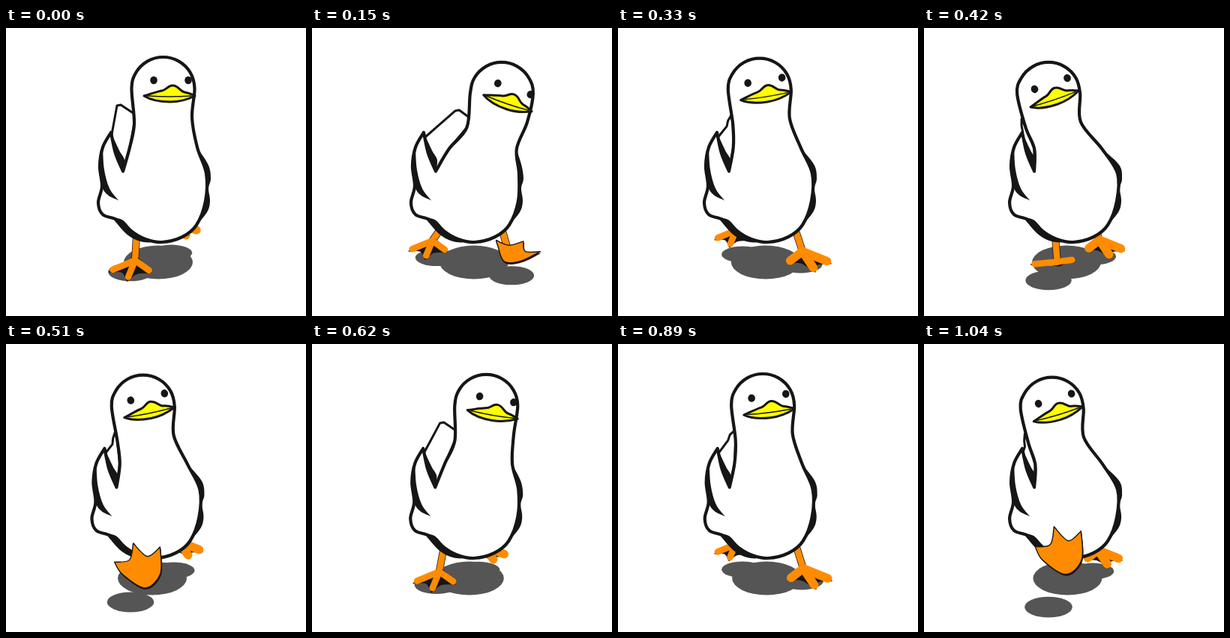
These frames come from a looping animation (400 px wide and 386 px high, 1140 ms). An HTML page with a canvas:

```html
<!DOCTYPE html>
<html lang="en">
<head>
<meta charset="utf-8">
<title>Walking duck</title>
<style>
  html, body { margin: 0; width: 100%; height: 100%; overflow: hidden; background: #fff; }
  canvas { display: block; }
</style>
</head>
<body>
<canvas id="stage" width="400" height="386"></canvas>
<script>
const ctx = document.getElementById('stage').getContext('2d');
const INK = '#161616', ORANGE = '#ff8c00', YELLOW = '#ffff00', SHADE = '#555';
const LOOP = 1140, STRIDE = LOOP / 2;

const mix = (a, b, k) => a + (b - a) * k;
const smooth = (from, to, v) => {
  const k = Math.min(1, Math.max(0, (v - from) / (to - from)));
  return k * k * (3 - 2 * k);
};
const outline = s => s.trim().split(/\s+/).map(p => p.split(',').map(Number));

// Eased path through a few [time, value] points
function follow(keys, u) {
  const i = keys.findIndex(k => k[0] > u);
  const [a, b] = [keys[i - 1], keys[i]];
  return mix(a[1], b[1], smooth(a[0], b[0], u));
}

// The duck standing upright
const neck = outline('156,192 165,160 171,128');
const head = Array.from({ length: 7 }, (_, i) => {
  const a = Math.PI * (1 + i / 6);
  return [209.5 + 42 * Math.cos(a), 81 + 42 * Math.sin(a)];
});
const flank = outline(`248,120 255,160 267,195 266,232 254,264 235,280 208,287
  186,283 166,272 148,257`);
const wing = outline('129,250 123,234 128,212 125,185 129,160 140,140');
const fold = outline('140,140 146,168 156,192');
const foldEdge = outline('156,193 158,177 151,164 140,140');
const feather = outline('129,160 125,185 128,212 136,224 150,231');
const featherEdge = outline('150,231 138,215 131,190 129,160');
const farSide = outline('256,162 270,184 273,202 270,215 272,232 268,247 252,266');
const belly = outline('142,255 155,257 169,271 186,282 208,286');
const bellyEdge = outline('208,286 184,287 163,278 142,255');

// Foot around its centre: ankle, toe, web, toe, web, toe, ankle, heel
const flatFoot = outline('0,-10 -28,5 -11,5 -4,17 9,7 28,6 13,-11 6,-13');
const soleFoot = outline('-22,14 -32,-4 -12,-7 -7,-31 12,-12 29,-25 30,13 9,33');

// Gait over one stride: ground position and height above it
const ground = [[0, 327], [.3, 307], [.55, 302], [.84, 353], [1, 327]];
const lift = [[0, 0], [.25, 8], [.46, 30], [.6, 18], [.74, 18], [.82, 72], [1, 0]];

// Smooth runs joined by corners
function shape(...runs) {
  const path = new Path2D();
  path.moveTo(...runs[0][0]);
  for (const p of runs) {
    for (let i = 0; i < p.length - 1; i++) {
      const a = p[i - 1] || p[i], b = p[i], c = p[i + 1], d = p[i + 2] || c;
      path.bezierCurveTo(
        b[0] + (c[0] - a[0]) / 6, b[1] + (c[1] - a[1]) / 6,
        c[0] - (d[0] - b[0]) / 6, c[1] - (d[1] - b[1]) / 6, c[0], c[1]);
    }
  }
  path.closePath();
  return path;
}

function paint(path, fill, width) {
  if (fill) {
    ctx.fillStyle = fill;
    ctx.fill(path);
  }
  if (width) {
    ctx.strokeStyle = INK;
    ctx.lineWidth = width;
    ctx.stroke(path);
  }
}

function line(from, to, color, width) {
  ctx.strokeStyle = color;
  ctx.lineWidth = width;
  ctx.beginPath();
  ctx.moveTo(...from);
  ctx.lineTo(...to);
  ctx.stroke();
}

function oval(x, y, rx, ry, color) {
  ctx.fillStyle = color;
  ctx.beginPath();
  ctx.ellipse(x, y, rx, ry, 0, 0, 7);
  ctx.fill();
}

// Hips shift early, the neck and head swing further
const hipShift = sway => 9 * Math.tanh(3 * sway);
function bend([x, y], sway) {
  const k = 1 - smooth(100, 190, y);
  const hip = hipShift(sway);
  return [x + mix(hip, 43.5 * sway, k), y + 7 * sway * sway * k];
}

function makeFoot(u, turn) {
  const near = follow(ground, u);
  const y = turn ? mix(300, near, .73) - .5 : near;
  const reach = (y - 300) / 52;
  const x = turn ? 230 + 62 * reach : 150 + 30 * reach;
  const cy = y - 5 - follow(lift, u);
  const pitch = smooth(.68, .82, u) * (1 - smooth(.88, 1, u));
  const size = .75 + .25 * Math.min(1, Math.max(0, reach * 4));
  const c = Math.cos(turn * .7), s = Math.sin(turn * .7);
  const points = flatFoot.map(([fx, fy], i) => {
    const [sx, sy] = soleFoot[i];
    return [
      x + size * mix(fx + turn * fy, sx * c - sy * s, pitch),
      cy + size * mix(fy, sx * s + sy * c, pitch)
    ];
  });
  const shadowX = turn ? 217 + (y - 299) * 1.5 : 166;
  return { points, turn, raised: pitch > .5, shadow: [shadowX, y] };
}

function drawFootShadow({ shadow: [x, y] }) {
  const depth = y - 305;
  oval(x, y, 28 + depth * .08, 11 + depth * .06, SHADE);
}

const midpoint = (a, b) => [(a[0] + b[0]) / 2, (a[1] + b[1]) / 2];

function drawLeg({ points, turn }, sway) {
  const ankle = midpoint(points[0], points[6]);
  const hip = [mix((turn ? 230 : 178) + hipShift(sway), ankle[0], .6), 270];
  line(hip, ankle, INK, 10);
  line(hip, ankle, ORANGE, 8.5);
}

function drawFoot({ points, turn, raised }) {
  const [ankleA, toe1, web1, toe2, web2, toe3, ankleB, heel] = points;
  const path = shape([toe1, web1, toe2], [toe2, web2, toe3], [toe3, ankleB, heel, ankleA, toe1]);
  if (raised) {
    ctx.save();
    ctx.translate(1, 2);
    paint(path, INK);
    ctx.restore();
    paint(path, ORANGE, 1.4);
    return;
  }
  paint(path, INK, 1.5);
  const top = midpoint(ankleA, ankleB);
  for (const toe of [toe1, toe2, toe3]) {
    line(top, [mix(toe[0], top[0], .14), mix(toe[1], top[1], .2)], ORANGE, 8.5 + 3 * turn);
  }
}

function drawBody(sway) {
  const bent = points => points.map(p => bend(p, sway));
  const moved = points => points.map(([x, y]) => [x + hipShift(sway), y]);
  const tuck = Math.max(0, -Math.tanh(3 * sway));

  const tip = bent([[148 + 16 * tuck, 104 + 30 * tuck], [153 + 14 * tuck, 103 + 22 * tuck], [171, 115]]);
  const [root] = moved([[140, 148]]);
  const backWing = [root, ...tip, ...bent(neck).reverse()];
  paint(shape(...backWing.slice(1).map((p, i) => [backWing[i], p])), '#fff', 3);

  paint(shape(bent(farSide)), INK);
  const back = bent([...neck, ...head, ...flank]);
  paint(shape([...back, ...moved(wing)], moved(fold)), '#fff', 4.2);
  paint(shape(moved(fold), moved(foldEdge)), INK);
  paint(shape(moved(feather), moved(featherEdge)), INK);
  paint(shape(moved(belly), moved(bellyEdge)), INK);
}

const beak = new Path2D('M-25 0C-15-3-7-6-1-7C5-8 7-14 13-14C21-14 23-6 29-5C35-4 41-1 43 0' +
  'C33 5 21 8 10 8C-3 8-17 5-25 0Z');
const mouth = new Path2D('M-20 0Q9 2 38 0');

function drawFace(sway) {
  const [dx, dy] = bend([0, 91], sway);
  ctx.save();
  ctx.translate(209 + dx, dy);
  ctx.rotate(sway * Math.PI / 9.5);
  paint(beak, YELLOW, 3);
  paint(mouth, null, 1.5);
  for (const x of [-12, 34]) oval(x, -21, 4.8, 5.2, INK);
  ctx.restore();
}

function draw(t) {
  const u = t / STRIDE % 1;
  const sway = Math.sin(2 * Math.PI * u);
  const feet = [makeFoot(u, 0), makeFoot((u + .5) % 1, 1)];

  ctx.fillStyle = '#fff';
  ctx.fillRect(0, 0, 400, 386);
  oval(203 + 13 * sway, 314, 46, 22.5, SHADE);
  feet.forEach(drawFootShadow);

  feet.forEach(f => drawLeg(f, sway));
  feet.filter(f => !f.raised).forEach(drawFoot);
  drawBody(sway);
  drawFace(sway);
  feet.filter(f => f.raised).forEach(drawFoot);
}

// Drawings change every 30 ms, with one 20 ms step and a hold at the end
function stepTime(t) {
  const from = t < 530 ? 0 : 530;
  return Math.min(1040, from + Math.floor((t - from) / 30) * 30);
}

ctx.lineJoin = ctx.lineCap = 'round';
const start = performance.now();
function tick() {
  draw(stepTime((performance.now() - start) % LOOP));
  requestAnimationFrame(tick);
}
tick();
</script>
</body>
</html>
```
